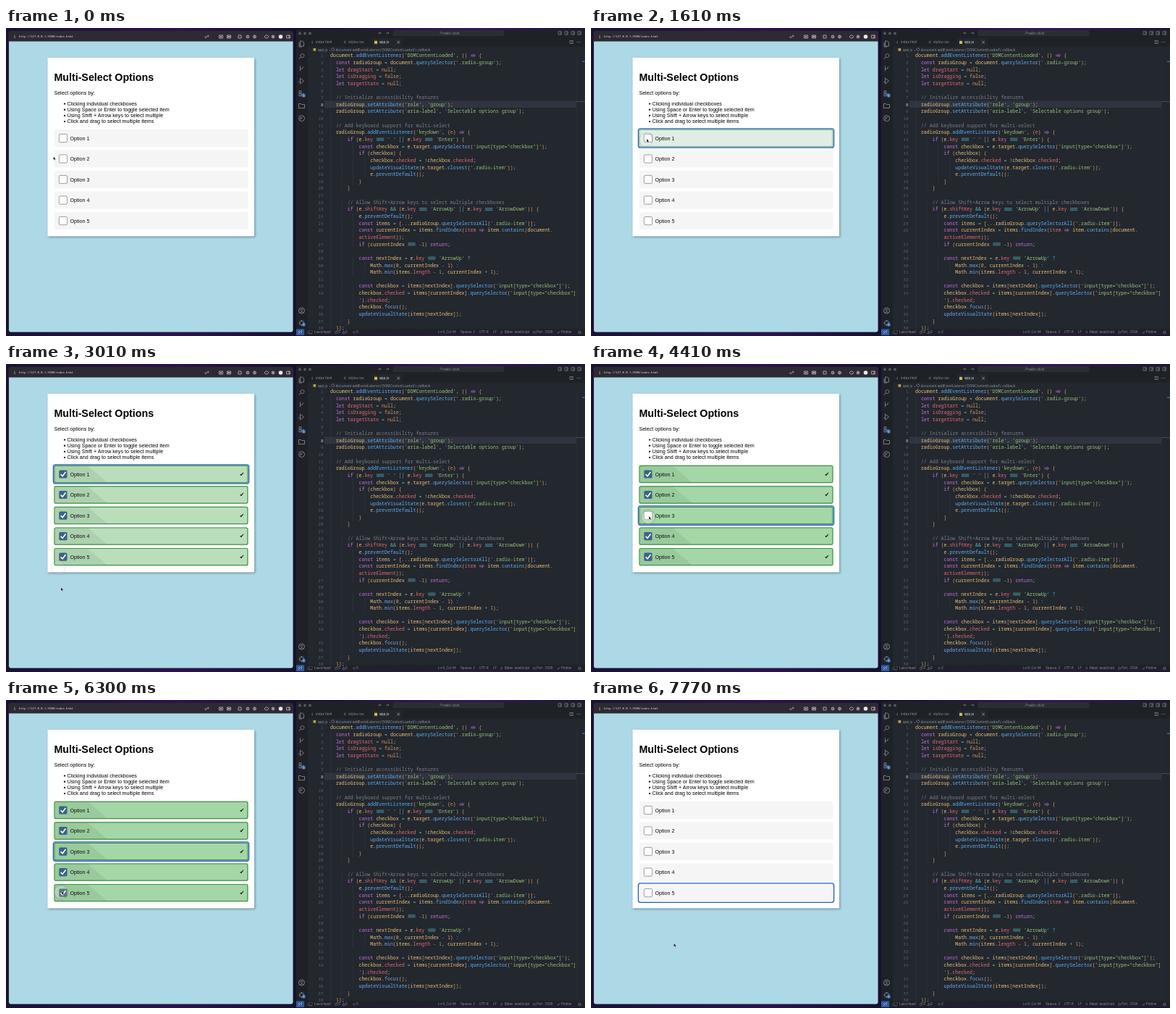
An HTML page for the animation above (7.84 s loop, 800 by 425 pixels).

```html
<!DOCTYPE html>
<html lang="en">
<head>
<meta charset="utf-8">
<title>Multi-select options</title>
<style>
  html, body { margin: 0; width: 100%; height: 100%; overflow: hidden; background: #16122a; }
  svg { display: block; width: 800px; height: 425px; }
  text { font-family: "Liberation Sans", Arial, sans-serif; white-space: pre; }
  .code text { font: 500 6.58px "Noto Sans Mono", "DejaVu Sans Mono", monospace; }
  .url { font-family: "Noto Sans Mono", monospace; }
  .ui text { font-family: Inter, "Open Sans", sans-serif; font-size: 4.6px; fill: #8d929b; }
</style>
</head>
<body>
<svg id="stage" viewBox="0 0 800 425" xmlns="http://www.w3.org/2000/svg"></svg>
<script>
const LOOP = 7840, STEP = 70;
const CH = 3.948, CODE_X = 448, CODE_Y = 40.3, LINE_H = 9.64;
const PITCH = 28.52, ROW_Y = 140;

const source = `document.addEventListener('DOMContentLoaded', () => {
  const radioGroup = document.querySelector('.radio-group');
  let dragStart = null;
  let isDragging = false;
  let targetState = null;

  // Initialize accessibility features
  radioGroup.setAttribute('role', 'group');
  radioGroup.setAttribute('aria-label', 'Selectable options group');

  // Add keyboard support for multi-select
  radioGroup.addEventListener('keydown', (e) => {
      if (e.key === ' ' || e.key === 'Enter') {
          const checkbox = e.target.querySelector('input[type="checkbox"]');
          if (checkbox) {
              checkbox.checked = !checkbox.checked;
              updateVisualState(e.target.closest('.radio-item'));
              e.preventDefault();
          }
      }

      // Allow Shift+Arrow keys to select multiple checkboxes
      if (e.shiftKey && (e.key === 'ArrowUp' || e.key === 'ArrowDown')) {
          e.preventDefault();
          const items = [...radioGroup.querySelectorAll('.radio-item')];
          const currentIndex = items.findIndex(item => item.contains(document.
          activeElement));
          if (currentIndex === -1) return;

          const nextIndex = e.key === 'ArrowUp' ?
              Math.max(0, currentIndex - 1) :
              Math.min(items.length - 1, currentIndex + 1);

          const checkbox = items[nextIndex].querySelector('input[type="checkbox"]');
          checkbox.checked = items[currentIndex].querySelector('input[type="checkbox"]
          ').checked;
          checkbox.focus();
          updateVisualState(items[nextIndex]);
      }
  });`.split('\n');
const wrappedRows = [26, 35];

const esc = s => s.replace(/&/g, '&amp;').replace(/</g, '&lt;').replace(/>/g, '&gt;');
const rect = (x, y, w, h, fill, extra = '') =>
  `<rect x="${x}" y="${y}" width="${w}" height="${h}" fill="${fill}" ${extra}/>`;
const label = (x, y, s, extra = '') => `<text x="${x}" y="${y}" ${extra}>${esc(s)}</text>`;
const line = (d, color, w = .7, extra = '') =>
  `<path d="${d}" fill="none" stroke="${color}" stroke-width="${w}" ${extra}/>`;
const dot = (x, y, r, fill) => `<circle cx="${x}" cy="${y}" r="${r}" fill="${fill}"/>`;

function tokenColor(token, before, after) {
  if (token.startsWith('//')) return '#7a808b';
  if (token[0] === "'") return '#98c379';
  if (/^(const|let|if|return)$/.test(token)) return '#c678dd';
  if (/^(null|false|\d+)$/.test(token)) return '#d19a66';
  if (/^\w/.test(token)) {
    if (after === '(') return '#61afef';
    if (before === '.') return after === '.' ? '#e5c07b' : '#e06c75';
    return /^(dragStart|isDragging|targetState|e|item|activeElement)$/.test(token) && after !== '.'
      ? '#e06c75' : '#e5c07b';
  }
  if (/^[=!|&+?:-]/.test(token)) return '#56b6c2';
  return /[()[\]{}]/.test(token) ? '#d0a56a' : '#abb2bf';
}

// Wide operators are drawn as strokes across their character cells.
function operator(token, x, y) {
  const w = token.length * CH, l = x + .7, r = x + w - .7;
  if (token === '=>') return line(
    `M${l} ${y - 3.1}H${r - 1.4}M${l} ${y - 1.5}H${r - 1.4}M${r - 2.8} ${y - 4.4}L${r} ${y - 2.3}L${r - 2.8} ${y - .2}`, '#c678dd', .6);
  return line([-3.9, -2.3, -.7].map(d => `M${l} ${y + d}H${r}`).join(''), '#56b6c2', .6);
}

function codeView() {
  let out = rect(440, 100.4, 348, 9.6, '#2f343e'), number = 0;
  source.forEach((raw, row) => {
    const y = CODE_Y + row * LINE_H;
    const indent = raw ? raw.search(/\S/) : (row > 9 && row < 20 || row > 20 ? 6 : 2);
    for (let c = 0; c < indent; c += 4)
      out += rect(CODE_X + c * CH, y - 7.3, .4, LINE_H, '#3b414c');
    if (!wrappedRows.includes(row)) {
      number++;
      out += label(438.5, y, String(number), `text-anchor="end" style="font-size:6px" fill="${number === 8 ? '#c5cad3' : '#596070'}"`);
    }
    const text = raw.trim();
    let spans = '', marks = '';
    for (const m of text.matchAll(/\/\/.*|^'(?=\))|'[^']*'?|\w+|===|=>|\s+|[^\w\s]/g)) {
      const token = m[0], at = m.index;
      if (token === '===' || token === '=>') {
        marks += operator(token, CODE_X + (indent + at) * CH, y);
        spans += ' '.repeat(token.length);
      } else {
        spans += `<tspan fill="${tokenColor(token, text[at - 1], text[at + token.length])}">${esc(token)}</tspan>`;
      }
    }
    if (text) out += `<text x="${CODE_X + indent * CH}" y="${y}">${spans}</text>` + marks;
  });
  return `<g class="code">${out}</g>`;
}

function desktop() {
  return `<defs>
    <linearGradient id="desk"><stop stop-color="#1a1236"/><stop offset=".3" stop-color="#2d1250"/>
      <stop offset=".5" stop-color="#171030"/><stop offset=".8" stop-color="#43146a"/><stop offset="1" stop-color="#1b1238"/></linearGradient>
    <filter id="soft" x="-10%" y="-10%" width="120%" height="120%"><feGaussianBlur stdDeviation="1.6"/></filter>
    <clipPath id="screen"><rect width="800" height="425"/></clipPath>
  </defs>` + rect(0, 0, 800, 425, 'url(#desk)');
}

function browser() {
  const icon = '#d5d5da';
  const box = (x, w) => line(`M${x - w / 2} 10h${w}v4h${-w}z`, icon, .7);
  const ring = x => `<circle cx="${x}" cy="12" r="2" fill="none" stroke="${icon}" stroke-width=".7"/>`;
  const bullets = ['Clicking individual checkboxes', 'Using Space or Enter to toggle selected item',
    'Using Shift + Arrow keys to select multiple', 'Click and drag to select multiple items'];
  return rect(3.5, 4, 393.5, 416, '#2c2b31', 'rx="3.5"') +
    `<path d="M4 18.5H396.5V416.5a3 3 0 0 1-3 3H7a3 3 0 0 1-3-3z" fill="#add8e6"/>` +
    line('M12 11.5v2.5M12 9.8v.8', icon, .8) +
    label(18, 13.3, 'http://127.0.0.1:5500/index.html', 'class="url" font-size="3.88" fill="#e4e4e8"') +
    line('M276 13.5l3.5-3.5M276 11.2l-1 1.4 1.4 1.4M279 12.6l1.2-1.4-1.4-1.4', icon) +
    box(297, 5) + dot(297, 12, 1, icon) + box(308, 5) + rect(306.5, 11.2, 3, 1.6, icon) +
    box(323, 4) + ring(334) + dot(334, 12, .8, icon) + ring(343.5) + line('M341.5 12h4M343.5 10v4', icon, .5) +
    line('M357 12l2-2h2l2 2-2 2h-2z', icon) + ring(369) + dot(369, 12, 1, icon) +
    dot(379.5, 12, 2.8, '#e9e9ec') + box(390, 4.6) + line('M391 10v4', icon) +
    rect(58.5, 42.5, 286, 246.5, '#47616b', 'opacity=".5" filter="url(#soft)"') +
    rect(57.5, 41, 285.5, 246.3, '#fff') +
    label(66.4, 73, 'Multi-Select Options', 'font-size="14.25" font-weight="700"') +
    label(66.4, 92, 'Select options by:', 'font-size="7.15"') +
    bullets.map((s, i) => dot(81, 104.6 + i * 8.15, 1.15, '#000') +
      label(84.4, 107 + i * 8.15, s, 'font-size="7.15"')).join('');
}

function editorChrome() {
  const gray = '#8d929b';
  const sideIcons = [
    'M-2-3.5h3l2 2v5h-5zM-3.5-1.5v6h4', 'M-3.5 4L-1 1M1-3a2.5 2.5 0 1 1-.1 0z',
    'M-2-3.5v7M-2 1q4 0 4-3.5', 'M-2-4l5 4-5 4zM-4 2l2-2', 'M-3.5-3.5h3v3h-3zM-3.5.5h3v3h-3zM.5.5h3v3h-3z',
    'M-4-3h3l1 1h4v5h-8z', 'M-4 0a4 4 0 1 0 8 0a4 4 0 1 0-8 0M-1.5 2V-2M1.5-2l-3 2.5'];
  const place = (d, x, y) => line(d, gray, .8, `transform="translate(${x} ${y})"`);
  const panel = x => line(`M${x - 2} 4.8h4.4v4.4h-4.4zM${x + 1} 4.8v4.4`, gray, .6);
  const status = [[426, 'Launchpad'], [459, '0'], [469, '0'], [484, '0'], [597, 'Ln 8, Col 44'], [628, 'Spaces: 2'],
    [653.5, 'UTF-8'], [673, 'LF'], [683, '{}'], [689, 'Babel JavaScript'], [733, 'Port : 5500'], [767, 'Prettier']];
  return rect(401, 2.5, 402, 421.5, '#23272e', 'rx="3"') +
    rect(401, 2.5, 402, 11.5, '#1e2227', 'rx="3"') + rect(401, 14, 16, 402, '#1e2227') +
    rect(417, 14, 383, 11.3, '#1e2227') + rect(506, 14, 42, 11.3, '#23272e') +
    rect(401, 415.5, 399, 8.5, '#1e2227') + rect(401, 415.5, 11, 8.5, '#315d9f') +
    line('M404 418l2 1.8-2 1.8M409 417.2l-2 1.8 2 1.8', '#dfe6f2', .6) +
    '<g class="ui">' +
    ['#555960', '#555960', '#555960'].map((c, i) => dot(406 + i * 7, 7.5, 1.9, c)).join('') +
    line('M519 7h-4l1.5-1.5M515 7l1.5 1.5M525 7h4l-1.5-1.5M529 7l-1.5 1.5', gray, .6) +
    rect(535, 3.7, 153, 7, '#292d34', 'rx="1.5" stroke="#3c414a" stroke-width=".4"') +
    line('M599 8.6l1.3-1.3M601.6 5.2a1.2 1.2 0 1 1-.1 0z', gray, .5) + label(603.5, 8.8, 'radio-click') +
    [765, 774, 783, 792].map(panel).join('') +
    line('M424 18l-1.5 1.7 1.5 1.7', '#c9744b', .8) + label(428, 21.3, 'index.html') +
    line('M467 18.5h3M466.5 20.5h3M468 17.5v4', '#468db5', .5) + label(473, 21.3, 'styles.css') +
    rect(509, 17.8, 4, 4, '#d8b957') + label(516, 21.3, 'app.js', 'style="fill:#e0e3e8"') +
    line('M540.6 18l3.2 3.2M543.8 18l-3.2 3.2', '#d0d3d8', .6) +
    line('M779 17.5h4.5v4h-4.5zM781.2 17.5v4', gray, .6) + [789, 791, 793].map(x => dot(x, 19.6, .5, gray)).join('') +
    rect(424.5, 28, 3.7, 3.7, '#b79c4b') +
    label(431, 31.6, "app.js  ›") + line('M450 28.5l1.8-1 1.8 1v2.2l-1.8 1-1.8-1z', '#a975c4', .6) +
    label(455.5, 31.6, "document.addEventListener('DOMContentLoaded') callback") +
    sideIcons.map((d, i) => place(d, 408.5, 21.5 + i * 17.2)).join('') +
    place('M-4 0a4 4 0 1 0 8 0a4 4 0 1 0-8 0M-2.3 3q2.3-3 4.6 0M0-2.3a1.3 1.3 0 1 0 .1 0', 408.5, 390) +
    place('M-3 0a3 3 0 1 0 6 0a3 3 0 1 0-6 0M0-4v2M0 2v2M-4 0h2M2 0h2', 408.5, 407) +
    [93.3, 409.3].map(y => dot(411.3, y, 2.5, '#3b7bd0') + label(410.2, y + 1.2, '1', 'style="font-size:3.4px;fill:#fff"')).join('') +
    line('M416 421l4-4M418 421.5h5M422 417l2 2', gray, .6) +
    `<circle cx="456" cy="419.8" r="1.6" fill="none" stroke="${gray}" stroke-width=".5"/>` +
    line('M465 421.3l1.7-3.2 1.7 3.2zM480 418v3.5M482 418v3.5', gray, .5) +
    `<circle cx="730" cy="419.8" r="1.6" fill="none" stroke="${gray}" stroke-width=".5"/>` +
    line('M762 420l1 1.3 2.3-3M790.5 421h4l-.7-1v-1.5q-1.3-2-2.6 0v1.5z', gray, .6) +
    status.map(([x, s]) => label(x, 421.4, s, 'style="font-size:4.3px"')).join('') +
    '</g>' + rect(788, 33, .4, 382, '#30353e') + rect(796, 45.5, 4, 1.3, '#3f77bd') + rect(788, 101, 12, .7, '#555b66');
}

const rowMarkup = i => {
  const y = ROW_Y + i * PITCH;
  return `<g id="row${i}">
    <rect class="fill" x="67" y="${y}" width="267.5" height="24" rx="2.2"/>
    <g class="on"><path d="M67.5 ${y + .5}H113L140 ${y + 23.5}H67.5z" fill="#254b2b" opacity=".09"/></g>
    <rect class="edge" x="66.9" y="${y + .4}" width="267" height="23.2" rx="2" fill="none" stroke="#3c933f" stroke-width="1.15"/>
    <rect class="focus" x="65.4" y="${y - 1.2}" width="270.2" height="26.4" rx="3" fill="none" stroke="#1e5dbd" stroke-width="1.3"/>
    <rect class="box" x="73.3" y="${y + 6.4}" width="11.2" height="11.2" rx="1.6" stroke-width=".7"/>
    <g class="on"><path d="M75.6 ${y + 12.3}l2.5 2.5 4.3-5.9" fill="none" stroke="#fff" stroke-width="1.6"/>
      <text x="322.8" y="${y + 14.6}" font-size="8" style="font-family:'DejaVu Sans',sans-serif" fill="#10240f">✔</text></g>
    <text x="88.5" y="${y + 14.5}" font-size="7.15" fill="#111">Option ${i + 1}</text>
  </g>`;
};

const stage = document.getElementById('stage');
stage.innerHTML = desktop() + browser() + [0, 1, 2, 3, 4].map(rowMarkup).join('') +
  '<circle id="press" r="9.5" fill="#fff" fill-opacity=".3" stroke="#78828c" stroke-width=".7"/>' +
  '<path id="pointer" d="M0 0v5.2l1.3-1.1.9 1.9 1-.5-.9-1.8h1.6z" fill="#000" stroke="#fff" stroke-width=".35"/>' +
  `<g clip-path="url(#screen)">${editorChrome()}${codeView()}</g>`;

const rows = [0, 1, 2, 3, 4].map(i => {
  const g = document.getElementById('row' + i), find = s => g.querySelector('.' + s);
  return { fill: find('fill'), edge: find('edge'), focus: find('focus'), box: find('box'), on: g.querySelectorAll('.on') };
});
const press = document.getElementById('press'), pointer = document.getElementById('pointer');

// Each key is [time, ...values].
function sample(keys, t, ease = x => x) {
  let k = keys.findIndex(key => key[0] > t);
  if (k === 0) return keys[0].slice(1);
  if (k < 0) return keys[keys.length - 1].slice(1);
  const a = keys[k - 1], b = keys[k], p = ease((t - a[0]) / (b[0] - a[0]));
  return a.slice(1).map((v, i) => v + (b[i + 1] - v) * p);
}
const smooth = x => x * x * (3 - 2 * x);

const path = [[70, 65.5, 177.5], [560, 77, 153], [2100, 77, 153], [2450, 78, 204], [2700, 75, 262], [2870, 73, 283],
  [3010, 76, 308.5], [3220, 77, 314], [3360, 77, 314], [4130, 80, 210], [5740, 80, 210], [6160, 77, 264],
  [6300, 77, 264], [6830, 77, 154], [7000, 76, 147], [7350, 76, 147], [7770, 114.5, 336]];
const pointerAt = t => sample(path, t, t > 2100 && t < 3220 ? undefined : smooth);

const presses = [[770, 1000], [1330, 1500], [2100, 2870], [4270, 4480], [5390, 5560], [6300, 6980]];
const dragOn = [2170, 2310, 2450, 2550, 2660], dragOff = [6830, 6720, 6620, 6510, 6370];

const schedules = dragOn.map((on, i) => {
  const checked = [[on, dragOff[i]]];
  const keys = [[on, 0], [on + 140, .34], [2870, .34], [3100, 1]];
  if (i === 0) {
    checked.push([840, 1400]);
    keys.unshift([840, 0], [980, 1], [1400, 1], [1680, 0]);
  }
  if (i === 2) {
    checked[0] = [on, 4340];
    checked.push([5460, dragOff[i]]);
    keys.push([4410, 1], [4690, 0], [5460, 0], [5740, 1]);
  }
  keys.push([dragOff[i], 1], [dragOff[i] + 280, 0]);
  return { checked, keys };
});

const mix = (a, b, p) => `rgb(${a.map((v, i) => Math.round(v + (b[i] - v) * p))})`;

function render(t) {
  const [px, py] = pointerAt(t);
  const focused = t < 840 ? -1 : t < 4340 ? 0 : t < 6370 ? 2 : 4;
  const held = presses.find(([a, b]) => t >= a && t < b);
  rows.forEach((row, i) => {
    const { checked, keys } = schedules[i], [level] = sample(keys, t);
    const isOn = checked.some(([a, b]) => t >= a && t < b);
    const hover = Math.abs(py - (ROW_Y + i * PITCH + 12)) < 10;
    row.fill.setAttribute('fill', mix([245, 245, 245], [165, 214, 167], level));
    row.edge.setAttribute('opacity', Math.min(1, level * 2.3));
    row.focus.setAttribute('opacity', i === focused ? 1 : 0);
    row.on.forEach(g => g.setAttribute('opacity', isOn ? 1 : 0));
    const active = held && held[0] === 2100 && i === 0;
    row.box.setAttribute('fill', !isOn ? '#fff' : active ? '#5488b4' : hover ? '#2d4c68' : '#3b6289');
    row.box.setAttribute('stroke', isOn ? 'none' : '#777');
  });
  const ripple = presses.find(([a, b]) => t >= a && t < b + 210);
  press.setAttribute('opacity', ripple ? Math.min(1, (ripple[1] + 210 - t) / 210) * .75 : 0);
  if (ripple) {
    const [x, y] = pointerAt(Math.min(t, ripple[1]) - 25);
    press.setAttribute('cx', x - 1);
    press.setAttribute('cy', y + 1);
  }
  pointer.setAttribute('transform', `translate(${px} ${py}) scale(.85)`);
}

const start = performance.now();
function tick() {
  const t = (performance.now() - start) % LOOP;
  render(Math.floor(t / STEP) * STEP);
  requestAnimationFrame(tick);
}
tick();
</script>
</body>
</html>
```
